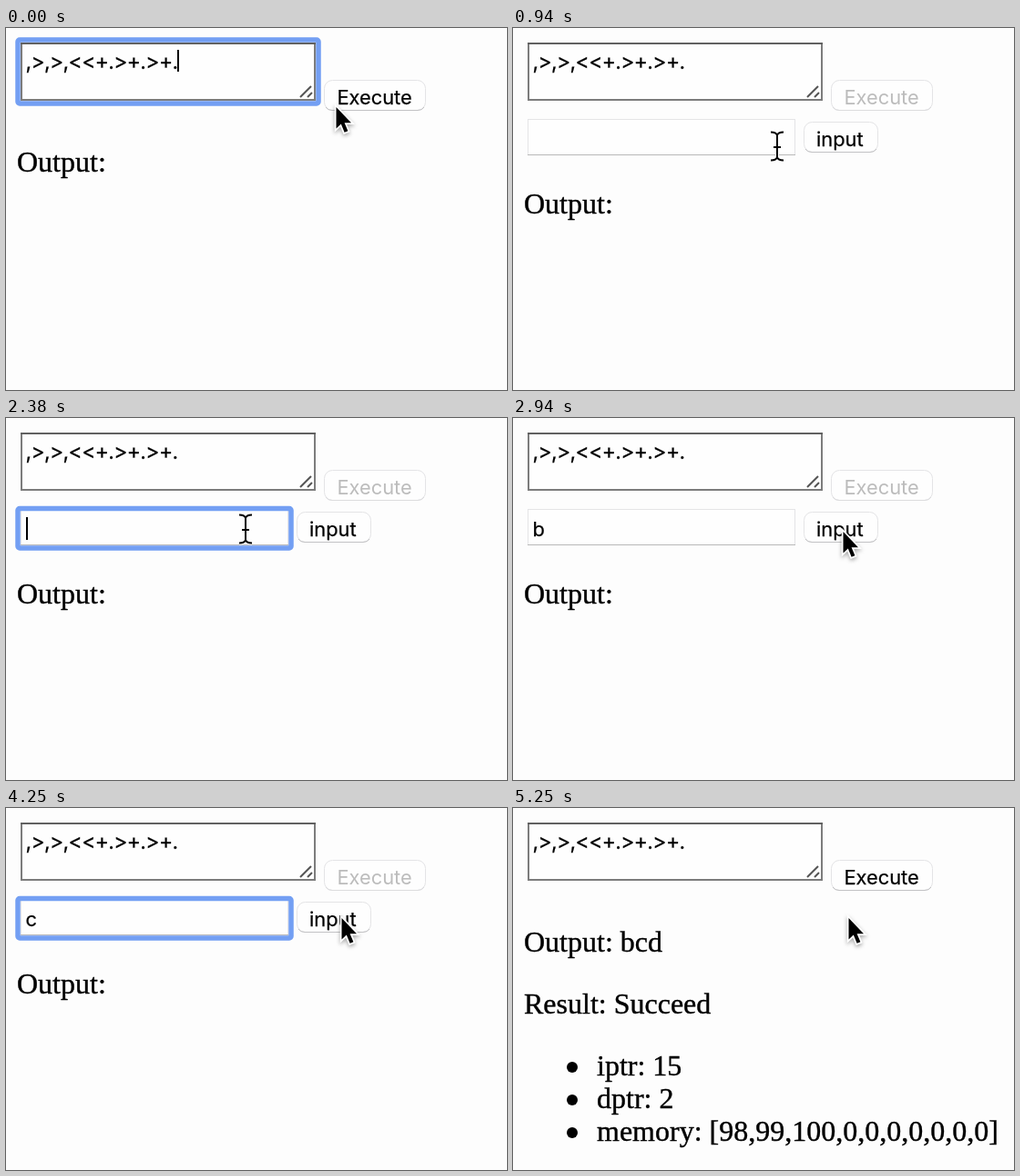
These frames come from a looping animation (550x398 px, 5560 ms). An HTML page:

```html
<!DOCTYPE html>
<html lang="en">
<meta charset="utf-8">
<title>Interpreter demo</title>
<style>
  html, body { margin: 0; height: 100%; overflow: hidden; background: #fdfdfd; }
  svg { display: block; width: 550px; height: 398px; }
  text { font: 32px "Liberation Serif", serif; white-space: pre; stroke: #000; stroke-width: .4; }
  .ui text { font: 21.8px Inter, sans-serif; font-variant-ligatures: none; stroke-width: .25; }
  .ui #code { font-size: 23px; letter-spacing: -.65px; }
  .ring { fill: none; stroke: #739ff3; stroke-width: 5.5; }
  .button rect { fill: #fefefe; stroke: #e4e4e6; }
  .button path { fill: none; stroke: #c2c2c4; }
  .disabled text { fill: #bcbcbc; stroke: none; }
  .disabled path { stroke: #dcdcde; }
  .caret { fill: #000; }
  #arrow { filter: drop-shadow(0 2px 2px #0005); }
</style>
<svg viewBox="0 0 550 398">
  <defs>
    <path id="beamLine" d="M-7-15.5Q-1-15.5 0-12 1-15.5 7-15.5M0-12V12M-7 15.5Q-1 15.5 0 12 1 15.5 7 15.5M-4 1H4"/>
  </defs>
  <g class="ui">
    <rect id="codeRing" class="ring" x="13" y="13" width="330" height="70" rx="2"/>
    <rect x="17" y="17" width="322" height="62" fill="#fefefe" stroke="#7c7c7c" stroke-width="2"/>
    <path d="M16 17H340" stroke="#616161" stroke-width="2"/>
    <path d="M323 76 335 64M331 76 336 71" stroke="#555" stroke-width="2"/>
    <text id="code" x="21.5" y="44.5">,&gt;,&gt;,&lt;&lt;+.&gt;+.&gt;+.</text>
    <rect id="codeCaret" class="caret" x="188" y="24" width="2" height="24"/>
    <g id="execute" class="button">
      <rect x="349.5" y="57.5" width="111" height="33" rx="9"/>
      <path d="M351 87Q353 90.5 358 90.5H452Q457 90.5 459 87"/>
      <text x="363.5" y="84">Execute</text>
    </g>
    <g id="row">
      <rect x="16.5" y="100.5" width="293" height="39" fill="#fefefe" stroke="#e4e4e6"/>
      <path d="M16 139.5H310" stroke="#b8b8b8"/>
      <rect id="fieldRing" class="ring" x="13" y="99.5" width="300" height="43.5" rx="2"/>
      <text id="field" x="21.5" y="130"></text>
      <rect id="fieldCaret" class="caret" y="109" width="2" height="25"/>
      <g class="button">
        <rect x="319.5" y="103.5" width="81" height="33" rx="9"/>
        <path d="M321 133Q323 136.5 328 136.5H392Q397 136.5 399 133"/>
        <text x="333" y="130">input</text>
      </g>
    </g>
  </g>
  <text id="output" x="12"></text>
  <g id="result">
    <text x="12" y="226">Result: Succeed</text>
    <circle cx="65" cy="285" r="6"/><text x="92" y="294">iptr: 15</text>
    <circle cx="65" cy="321" r="6"/><text x="92" y="330">dptr: 2</text>
    <circle cx="65" cy="357" r="6"/><text x="92" y="366">memory: [98,99,100,0,0,0,0,0,0,0]</text>
  </g>
  <g id="arrow">
    <path d="M1.5 2V25.5L6.8 20.5 10.6 29.8 14.4 28.2 10.6 19.2H18Z" stroke="#fff" stroke-width="3.5" paint-order="stroke"/>
  </g>
  <g id="beam" fill="none">
    <use href="#beamLine" stroke="#fff" stroke-width="4"/>
    <use href="#beamLine" stroke="#000" stroke-width="2"/>
  </g>
</svg>
<script>
const LOOP = 5560, STEP = 62.5;
const EXECUTED = 6, DONE = 73;
const $ = id => document.getElementById(id);
const show = (id, on) => $(id).style.display = on ? '' : 'none';
const within = (k, spans) => spans.some(([from, to]) => k >= from && k < to);

// Pointer stops: step, x, y
const stops = [
  [0, 361, 85], [1, 361, 85], [5, 405, 67], [8, 405, 67], [15, 290, 130],
  [18, 290, 130], [26, 379, 121], [27, 379, 121], [29, 379, 119], [30, 379, 119],
  [36, 263, 122], [39, 263, 122], [42, 361, 123], [47, 361, 123], [53, 276, 122],
  [57, 276, 122], [62, 364, 121], [65, 364, 121], [68, 367, 119], [89, 367, 119]
];
const focus = [[17, 30], [37, 47], [55, 71]];
const caret = [[17, 30], [37, 47], [55, 65]];
const typed = [['a', 22, 31], ['b', 39, 48], ['c', 57, 72]];

function pointer(k) {
  const i = stops.findIndex(s => s[0] > k);
  if (i < 0) return stops.at(-1).slice(1);
  const [k0, x0, y0] = stops[i - 1], [k1, x1, y1] = stops[i];
  const p = (k - k0) / (k1 - k0), e = p * p * (3 - 2 * p);
  return [x0 + (x1 - x0) * e, y0 + (y1 - y0) * e];
}

function draw(now) {
  const k = Math.floor((now % LOOP + 5) / STEP);
  const running = k >= EXECUTED && k < DONE, done = k >= DONE;
  show('codeRing', k < 5);
  show('codeCaret', k < 5);
  $('execute').classList.toggle('disabled', running);

  const entry = typed.find(([, from, to]) => k >= from && k < to);
  show('row', running);
  show('fieldRing', within(k, focus));
  show('fieldCaret', within(k, caret));
  $('field').textContent = entry ? entry[0] : '';
  $('fieldCaret').setAttribute('x', entry ? 34 : 22);

  $('output').textContent = done ? 'Output: bcd' : 'Output:';
  $('output').setAttribute('y', running ? 204 : 158);
  show('result', done);

  const [x, y] = pointer(k);
  const overField = running && x < 310 && y > 100 && y < 140;
  show('beam', overField);
  show('arrow', !overField);
  $(overField ? 'beam' : 'arrow').setAttribute('transform', `translate(${x} ${y})`);
}

let start;
function tick(now) {
  start ??= now;
  draw(now - start);
  requestAnimationFrame(tick);
}
draw(0);
requestAnimationFrame(tick);
</script>
</html>
```
